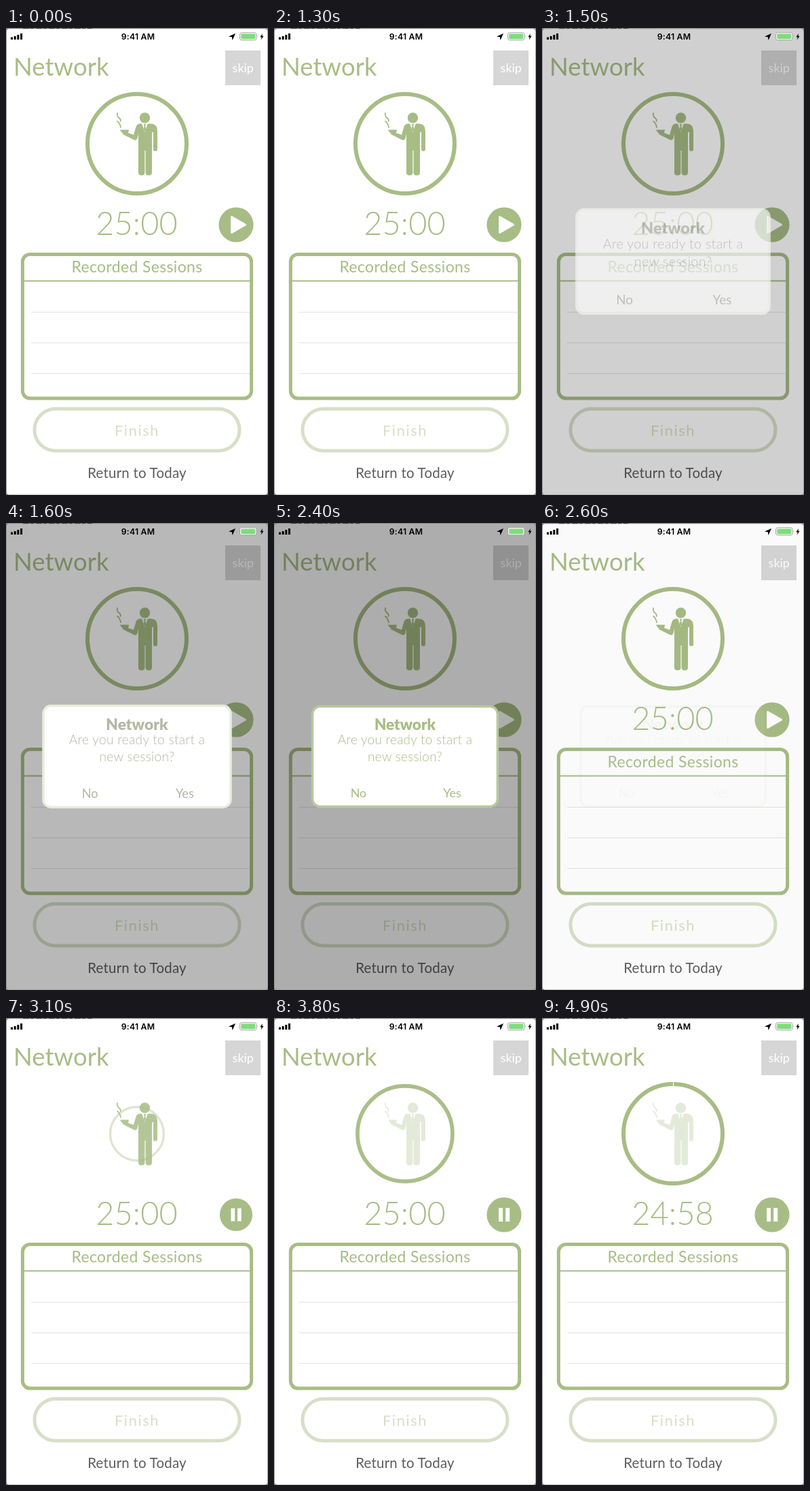
These frames come from a looping animation (386 px wide and 686 px high, 5100 ms). An HTML page:

```html
<!DOCTYPE html>
<html lang="en">
<head>
<meta charset="utf-8">
<title>Session timer</title>
<style>
  html, body { margin: 0; width: 100%; height: 100%; overflow: hidden; background: #fff; }
  svg { display: block; width: 386px; height: 686px; font-family: Lato, "Open Sans", sans-serif; }
  .mid { text-anchor: middle; }
  .green { fill: #a7bd85; }
  .line { fill: none; stroke: #a7bd85; }
</style>
</head>
<body>
<svg viewBox="0 0 386 686">
  <rect width="386" height="686" fill="#858589"/>
  <path d="M25 .7H127" stroke="#3c3c40" stroke-width="1.4" stroke-dasharray="9 2 5 3"/>
  <rect x=".9" y="1.2" width="384.3" height="684.2" rx="4" fill="#fff"/>

  <!-- status bar -->
  <path d="M7 13.5h3v3.5h-3zM11.7 12h3v5h-3zM16.4 10h3v7h-3zM21.1 8h3v9h-3z"/>
  <text class="mid" x="194.5" y="17" font-size="12.3" font-weight="600" letter-spacing=".2" style="font-family:Inter,sans-serif">9:41 AM</text>
  <path d="M338 8L333.6 18L332.8 13.2L328 12.4Z"/>

  <text class="green" x="11" y="70" font-size="36.5">Network</text>
  <rect x="323" y="33" width="52" height="51" fill="#d6d6d6"/>
  <text class="mid" x="349.3" y="65" font-size="18" fill="#fff">skip</text>

  <circle id="ring" class="line" r="73" stroke-width="6" pathLength="750"/>

  <g id="man" class="green">
    <circle cx="204.5" cy="132" r="7.7"/>
    <path d="M198 140.5H213Q223 140.5 223 151V178Q223 181 220 181T217 178V153H215V212.5Q215 216.5 210.3 216.5T205.6 212.5V180H204.4V212.5Q204.4 216.5 199.7 216.5T195 212.5V155L193.5 162Q192 166 188 164L172 156L174 152L188 157L191.5 145Q193 140.5 198 140.5Z"/>
    <path d="M168 149.5H181Q181 155.5 175.5 155.5Q170.5 155.5 168 149.5Z"/>
    <path d="M200 140L204.5 153L209 140Z" fill="#fff"/>
    <path d="M202.8 141H206.2L205.3 144L206.3 149L204.5 152L202.7 149L203.7 144Z"/>
    <path class="line" d="M164 125Q163 129 166.5 132T168.5 137M164 137Q168 140 169 146" stroke-width="1.8" stroke-linecap="round"/>
  </g>

  <text id="clock" class="mid green" x="192.5" y="304" font-size="47" font-weight="300"></text>

  <g id="button">
    <circle class="green" r="25.6"/>
    <path id="play" d="M-6.5 -11.5L13.5 0L-6.5 11.5Z" fill="#fff" stroke="#fff" stroke-width="3" stroke-linejoin="round"/>
    <path id="pause" d="M-8 -10h6v20h-6zM2.2 -10h6v20h-6z" fill="#fff"/>
  </g>

  <path d="M37 417.5H359M37 462.5H359M37 507.5H359" stroke="#e2e2e2"/>
  <rect class="line" x="24.4" y="332.4" width="337.2" height="211.7" rx="11" stroke-width="5"/>
  <path class="line" d="M25 371.5H361" stroke-width="2"/>
  <text class="mid green" x="193" y="359" font-size="23" letter-spacing=".35">Recorded Sessions</text>

  <rect x="42" y="559.5" width="302" height="61.5" rx="30.7" fill="none" stroke="#d7dfc8" stroke-width="5"/>
  <text class="mid" x="193" y="599" font-size="22" letter-spacing="1.5" fill="#d7dfc8">Finish</text>
  <text class="mid" x="193" y="661" font-size="20.5" letter-spacing=".2" fill="#5d5d5d">Return to Today</text>

  <rect id="dim" x=".9" y="1.2" width="384.3" height="684.2" rx="4"/>

  <!-- battery -->
  <rect x="344.5" y="6.8" width="24.5" height="11" rx="2.8" fill="#fff" stroke="#a2a2a2"/>
  <rect x="346.2" y="8.4" width="21.1" height="7.8" rx="1.4" fill="#7fdc7c"/>
  <path d="M370.3 10.3q1.6 2 0 4z" fill="#a2a2a2"/>
  <path d="M378 8L374.3 13.2H376.6L375.7 17.4L379.6 11.8H377.2Z"/>

  <g id="dialog" class="mid">
    <rect id="frame" x="56.7" y="269.5" width="272.6" height="147" rx="11" fill="#fff" stroke-width="3.4"/>
    <g id="words">
      <text x="193" y="304" font-size="22.5" font-weight="900">Network</text>
      <g font-size="19" font-weight="300" letter-spacing=".25">
        <text x="193" y="325">Are you ready to start a</text>
        <text x="193" y="350">new session?</text>
      </g>
      <text x="124.5" y="403" font-size="18">No</text>
      <text x="262.5" y="403" font-size="18">Yes</text>
    </g>
  </g>
</svg>
<script>
  const LOOP = 5100, STEP = 100;
  const $ = id => document.getElementById(id);
  const set = (id, attrs) => {
    for (const key in attrs) $(id).setAttribute(key, attrs[key]);
  };
  const span = (t, from, to) => Math.min(1, Math.max(0, (t - from) / (to - from)));
  const easeOut = (p, power = 3) => 1 - (1 - p) ** power;
  const mix = (a, b, p) => `rgb(${a.map((v, i) => Math.round(v + (b[i] - v) * p))})`;
  const GREEN = [167, 189, 133];

  function drawDialog(t) {
    const enter = easeOut(span(t, 1400, 1800)) * (t >= 1500);
    const leave = (1 - span(t, 2400, 2800)) ** 4;
    const grow = 1 + 0.1 * (1 - enter);
    const tint = span(t, 1500, 1900);
    set('dim', { opacity: 0.32 * enter * leave });
    set('dialog', {
      opacity: Math.min(1, enter * 1.15) * leave,
      transform: `translate(193 343) scale(${grow}) translate(-193 -343)`
    });
    set('frame', { stroke: mix([248, 249, 242], [183, 201, 157], tint) });
    set('words', { fill: mix([182, 184, 174], GREEN, tint) });
  }

  function drawTimer(t) {
    const elapsed = t >= 4900 ? 2 : t >= 3900 ? 1 : 0;
    const shrink = span(t, 2930, 3300);
    const regrow = easeOut(span(t, 3420, 4000));
    const back = t >= 3500;
    set('ring', {
      transform: `translate(193 170) rotate(-90) scale(${back ? regrow : 1 - shrink})`,
      opacity: back ? regrow : (1 - shrink) ** 1.5,
      'stroke-dasharray': `${750 - elapsed} ${elapsed}`,
      'stroke-dashoffset': -elapsed
    });
    set('man', { opacity: 1 - 0.7 * shrink ** 2 });
    $('clock').textContent = elapsed ? `24:${60 - elapsed}` : '25:00';

    const running = t >= 3000;
    const size = running ? 0.88 + 0.12 * span(t, 3000, 3200) : 1;
    set('button', { transform: `translate(339 289) scale(${size})` });
    set('play', { opacity: running ? 0 : 1 });
    set('pause', { opacity: running ? 1 : 0 });
  }

  function draw(now) {
    const t = Math.floor((now % LOOP) / STEP) * STEP;
    drawDialog(t);
    drawTimer(t);
  }

  const start = performance.now();
  function tick() {
    draw(performance.now() - start);
    requestAnimationFrame(tick);
  }
  tick();
</script>
</body>
</html>
```
